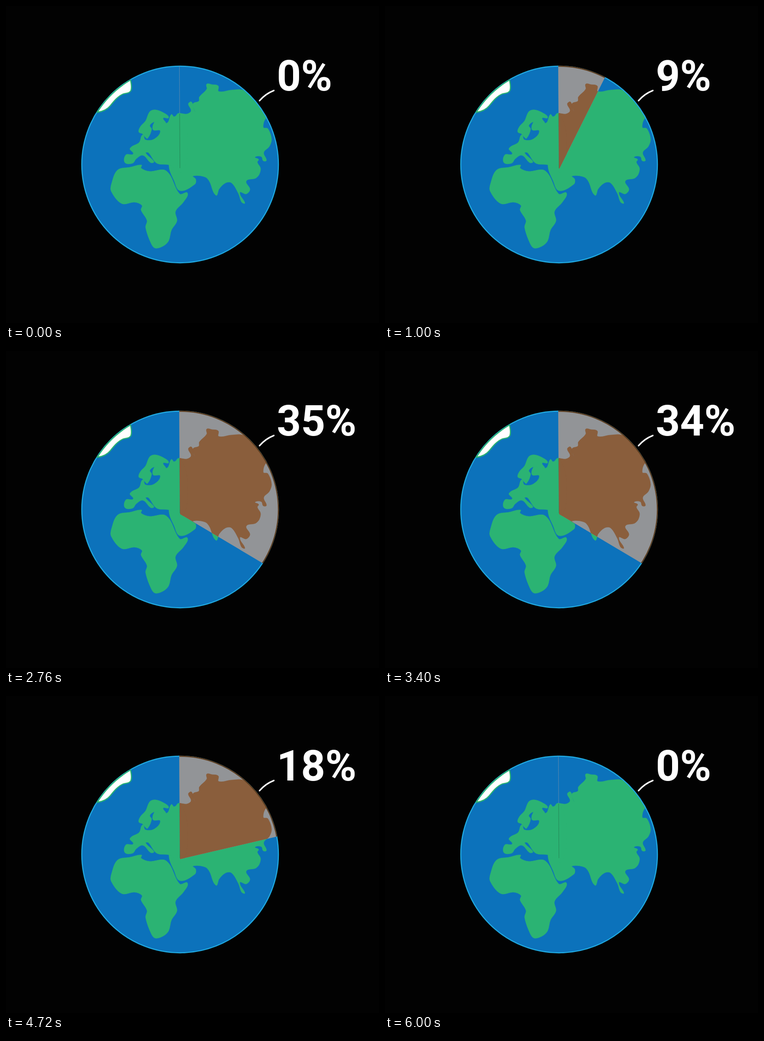
An HTML page for the animation above (6.16 s loop, 812 by 690 pixels).

```html
<!DOCTYPE html>
<html lang="en">
<head>
<meta charset="utf-8">
<title>Globe share</title>
<style>
  html, body { margin: 0; width: 100%; height: 100%; overflow: hidden; background: #020202; }
  svg { display: block; }
  #land path { fill: currentColor; stroke: currentColor; stroke-width: .8; }
  #label { font: 700 92px Roboto, Arial, sans-serif; fill: #fff; }
</style>
</head>
<body>
<svg width="812" height="690" viewBox="0 0 812 690">
  <defs>
    <clipPath id="disc"><circle cx="379" cy="345" r="214"/></clipPath>
    <clipPath id="slice"><path id="wedge"/></clipPath>
    <g id="land" clip-path="url(#disc)"></g>
  </defs>

  <circle cx="379" cy="345" r="214" fill="#0c72bb"/>
  <use href="#land" color="#2bb373"/>
  <circle cx="379" cy="345" r="214" fill="none" stroke="#1fa8e0" stroke-width="2.4"/>
  <path d="M377.5 131L378 234" stroke="#6d8fad" stroke-width=".8"/>
  <path d="M378 234L378.7 353" stroke="#247e50" stroke-width=".8"/>

  <g clip-path="url(#slice)">
    <circle cx="379" cy="345" r="214" fill="#929497"/>
    <use href="#land" color="#8a5e3c"/>
    <circle cx="379" cy="345" r="214" fill="none" stroke="#5c3c1e" stroke-width="2.4"/>
  </g>

  <path d="M198.500 231.500A214 214 0 0 1 271 161C273 170 274 178 272 184C268 191 261 189 254 192C243 197 235 207 227 217C219 227 209 230 198.500 231.500Z"
        fill="#fff" stroke="#2bb373" stroke-width="2.4" stroke-linejoin="round"/>
  <path d="M552 206Q565 191 583 184" fill="none" stroke="#fff" stroke-width="3.4" stroke-linecap="round"/>
  <text id="label" x="589.5" y="184">0%</text>
</svg>

<script>
const LOOP = 6160, STEP = 40, PEAK = 3080, END = 6000;
const byId = id => document.getElementById(id);

// Key points of each coast; neighbouring regions overlap inland.
const coasts = {
  asia: `372,236 394,235 403,228 397,213 404,209 411,229 407,213 420,207 421,198 437,181 437,170
    448,171 462,174 463,186 491,183 518,184 590,235 567,243 560,264 570,267 578,290 573,306 561,319
    567,336 560,337 556,328 542,329 550,334 547,340 554,353 551,367 543,375 523,381 531,399 523,409
    509,406 520,429 513,427 506,408 491,385 478,385 464,398 457,412 443,382 433,372 407,370 413,377
    411,388 379,402 366,380 355,350 360,300`,
  europe: `259,341 261,324 277,322 270,310 290,297 298,280 303,291 322,290 336,272 320,269 325,250
    338,243 350,255 360,236 366,241 379,234 395,280 385,360 356,346 328,342 310,319 304,320 322,339
    315,341 298,325 283,333 276,342`,
  nordic: `289,274 293,262 304,250 313,230 325,226 344,233 354,243 342,244 347,255 324,252 313,260
    317,268 308,288 302,284 297,278`,
  africa: `243,357 270,351 295,346 294,353 312,360 349,359 378,409 395,407 386,427 369,447 372,468
    360,488 354,511 343,522 325,527 316,517 304,482 307,467 294,444 296,434 280,427 252,430 229,403
    230,386`
};

// Smooth closed curve through the points, handles scaled to each segment.
function smooth(text) {
  const pts = text.split(/\s+/).map(p => p.split(',').map(Number));
  const at = i => pts[(i + pts.length) % pts.length];
  const tangent = i => {
    const [ax, ay] = at(i - 1), [bx, by] = at(i + 1);
    const len = Math.hypot(bx - ax, by - ay) || 1;
    return [(bx - ax) / len, (by - ay) / len];
  };
  let d = 'M' + pts[0];
  pts.forEach(([x, y], i) => {
    const [nx, ny] = at(i + 1), [tx, ty] = tangent(i), [ux, uy] = tangent(i + 1);
    const k = Math.hypot(nx - x, ny - y) * .32;
    d += `C${[x + tx * k, y + ty * k, nx - ux * k, ny - uy * k, nx, ny].map(v => v.toFixed(1))}`;
  });
  return d + 'Z';
}

for (const coast of Object.values(coasts)) {
  const path = document.createElementNS('http://www.w3.org/2000/svg', 'path');
  path.setAttribute('d', smooth(coast));
  byId('land').append(path);
}

// Same as cubic-bezier(a, 0, b, 1), solved by bisection.
function ease(x, a, b) {
  let lo = 0, hi = 1, s = .5;
  for (let i = 0; i < 24; i++) {
    const r = 1 - s;
    if (3 * a * s * r * r + 3 * b * s * s * r + s * s * s < x) lo = s; else hi = s;
    s = (lo + hi) / 2;
  }
  return s * s * (3 - 2 * s);
}

// Rise to the top at PEAK, then fall back to zero at END.
function swing(t, top, rise, fall) {
  return t < PEAK
    ? top * ease(t / PEAK, ...rise)
    : top * (1 - ease((t - PEAK) / (END - PEAK), ...fall));
}

function wedgePath(angle) {
  const ray = deg => {
    const a = deg * Math.PI / 180;
    return `L${(379 + 400 * Math.sin(a)).toFixed(2)} ${(355 - 400 * Math.cos(a)).toFixed(2)}`;
  };
  return 'M379 355' + ray(-.45) + ray(angle / 3) + ray(angle * 2 / 3) + ray(angle) + 'Z';
}

function draw(now) {
  const t = Math.min(END, Math.floor(now % LOOP / STEP) * STEP);
  const angle = swing(t, 121.8, [.533, .325], [.71, .63]);
  const percent = swing(t, 35.4, [.38, .56], [.28, .88]);
  byId('wedge').setAttribute('d', angle > .05 ? wedgePath(angle) : '');
  byId('label').textContent = Math.round(percent) + '%';
}

const start = performance.now();
function tick() {
  draw(performance.now() - start);
  requestAnimationFrame(tick);
}
tick();
</script>
</body>
</html>
```
